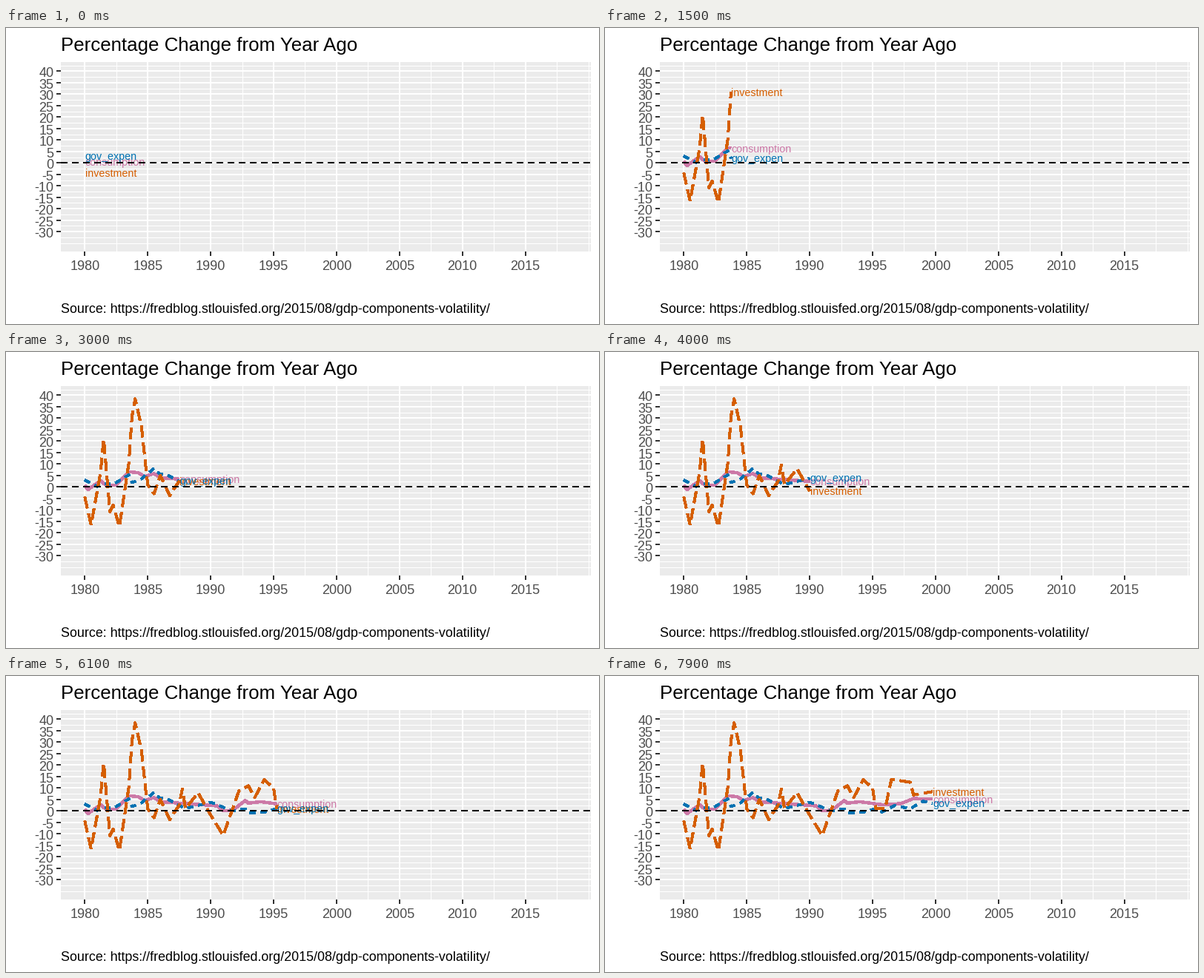
Write a matplotlib script that moves like this. It is 800 px wide and 400 px high and loops after 8000 ms.

```python
import matplotlib.pyplot as plt
import numpy as np
from matplotlib.animation import FuncAnimation
from matplotlib.patches import Rectangle

W, H, DPI = 800, 400, 100
FRAMES, INTERVAL = 80, 100  # one quarter per frame
PT = 72 / DPI  # points per pixel
LEFT, RIGHT, TOP, BOTTOM = 74, 789, 46, 302
INK, GREY = "black", "#4D4D4D"

plt.rcParams["font.family"] = "Liberation Sans"
plt.rcParams["lines.scale_dashes"] = False

# Turning points: (quarters since 1980, percent change); straight in between
CONSUMPTION = [
    (0, .7), (1, -1.2), (5, 2.7), (7, .4), (10, .9), (14, 6.6), (17, 6.2),
    (19, 4.5), (22, 5.8), (24, 4), (42, 2.2), (44, 0), (47, .3), (51, 4.5),
    (52, 3.4), (56, 4), (63, 2.7), (69, 3.2), (73, 5.4), (79, 5.2),
]
INVESTMENT = [
    (0, -4.4), (2, -16.6), (5, 6.2), (6, 21), (8, -10.8), (9, -8),
    (11, -17.3), (14, 10.5), (15, 30.8), (16, 38.4), (18, 26.4), (20, 1),
    (22, -3), (24, 5), (27, -3.8), (30, 2.6), (31, 9.6), (32, 1), (36, 7.9),
    (40, -1.8), (44, -10.7), (49, 8.8), (52, 11), (54, 5.8), (57, 13.6),
    (60, 10), (61, 1), (64, 1), (66, 13.8), (72, 12.5), (73, 7), (79, 8.4),
]
GOV_EXPEN = [
    (0, 3), (4, .2), (6, 1.5), (9, 1.1), (14, 5.2), (15, 1.9), (18, 3.5),
    (22, 8.1), (24, 5.5), (26, 5.4), (32, 1), (40, 3.8), (47, 0), (51, .9),
    (52, -1), (57, -.6), (61, 1), (63, -.5), (67, 2.3), (72, 1), (76, 4.2),
    (79, 3.3),
]


def px(year):
    return 106.3 + 16.98 * (year - 1980)


def py(value):
    return 182.3 - 3.096 * value


fig = plt.figure(figsize=(W / DPI, H / DPI), dpi=DPI, facecolor="white")
ax = fig.add_axes([0, 0, 1, 1])
ax.set_xlim(0, W)
ax.set_ylim(H, 0)
ax.axis("off")


def stroke(xs, ys, color, width, z, dash=None):
    """Hard-edged line; width and dash lengths in pixels."""
    style = (0, [d * PT for d in dash]) if dash else "-"
    line, = ax.plot(xs, ys, color=color, lw=width * PT, ls=style, zorder=z,
                    antialiased=False, solid_capstyle="butt",
                    dash_capstyle="butt", dash_joinstyle="round")
    return line


def hline(y, color, width, x0=LEFT, x1=RIGHT, **kw):
    stroke([x0, x1], [y, y], color, width, **kw)


def vline(x, color, width, y0=TOP, y1=BOTTOM, **kw):
    stroke([x, x], [y0, y1], color, width, **kw)


def write(x, y, text, size, color=INK, ha="left", z=5):
    return ax.text(x, y, text, fontsize=size * PT, color=color, ha=ha,
                   va="baseline", zorder=z)


ax.add_patch(Rectangle((LEFT, TOP), RIGHT - LEFT, BOTTOM - TOP,
                       fc="#EBEBEB", lw=0, antialiased=False, zorder=0))

# Minor grid, then major grid with ticks and labels
for v in np.arange(-35, 43, 2.5):
    hline(py(v), "white", 1, z=1)
for year in np.arange(1980, 2021, 2.5):
    vline(px(year), "white", 1, z=1)
for v in range(-30, 41, 5):
    hline(py(v), "white", 2, z=2)
    hline(py(v), "#333333", 2, LEFT - 6, LEFT, z=2)
    write(64.5, py(v) + 8, str(v), 18, GREY, "right")
for year in range(1980, 2016, 5):
    vline(px(year), "white", 2, z=2)
    vline(px(year), "#333333", 2, BOTTOM, BOTTOM + 6, z=2)
    write(px(year), 327, str(year), 18, GREY, "center")

write(74, 31, "Percentage Change from Year Ago", 25.85)
write(74, 385, "Source: https://fredblog.stlouisfed.org/2015/08/"
      "gdp-components-volatility/", 17.92)
hline(py(0), INK, 2, z=6, dash=(9, 6))

quarters = np.arange(FRAMES)
xs = px(1980 + quarters / 4)


class Series:
    def __init__(self, name, points, color, dash, drop, line_z, text_z):
        self.ys = py(np.interp(quarters, *zip(*points)))
        self.drop = drop  # from label centre down to its baseline
        self.line = stroke([], [], color, 3.4, line_z, dash)
        self.label = write(0, 0, name, 14.2, color, z=text_z)

    def show(self, i):
        self.line.set_data(xs[:i + 1], self.ys[:i + 1])
        self.label.set_position((xs[i] + .5, self.ys[i] + self.drop))
        return self.line, self.label


series = [
    Series("consumption", CONSUMPTION, "#CC79A7", None, 5.5, 3.0, 4.0),
    Series("gov_expen", GOV_EXPEN, "#0072B2", (8, 8), 4.5, 3.1, 4.2),
    Series("investment", INVESTMENT, "#D55E00", (16, 8), 5.5, 3.2, 4.1),
]


def update(i):
    return [artist for s in series for artist in s.show(i)]


anim = FuncAnimation(fig, update, frames=FRAMES, interval=INTERVAL,
                     init_func=lambda: update(0), repeat=True,
                     repeat_delay=0, blit=False)
plt.show()
```
